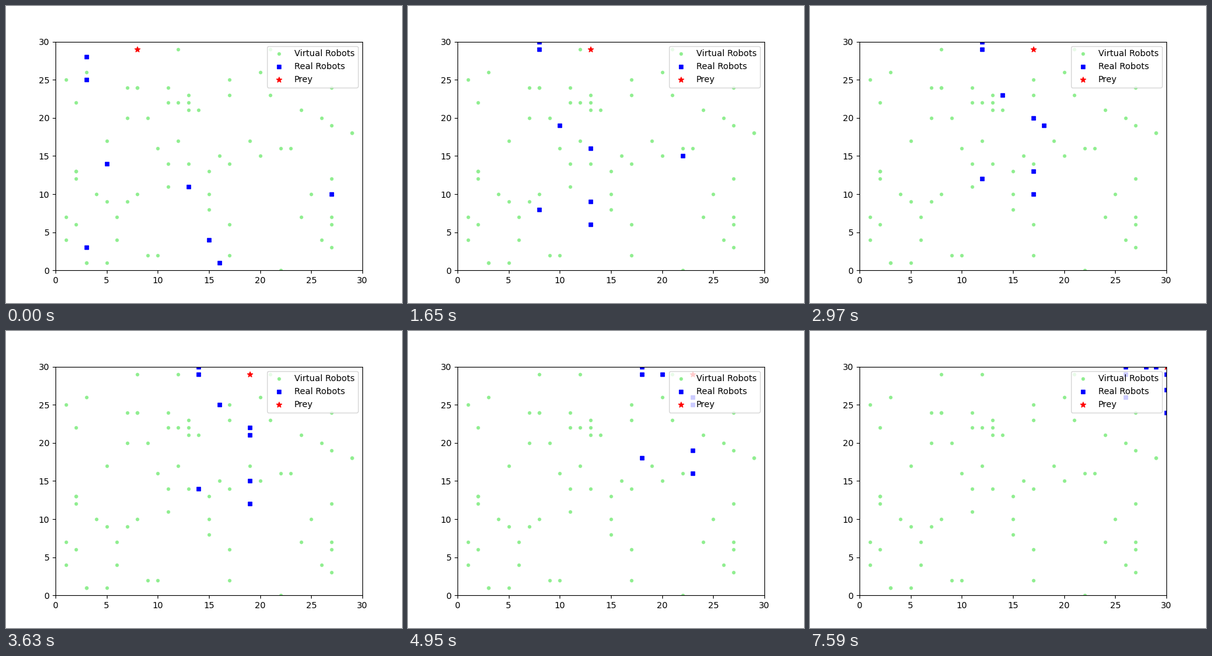
Animation of 640x480 px, one loop 9580 ms. Source, as a matplotlib script:

```python
import numpy as np
import matplotlib.pyplot as plt
from matplotlib.animation import FuncAnimation

SIZE = 30           # grid runs from 0 to SIZE on both axes
STEPS = 23
STEP_MS = 330
TICK_MS = 20
LOOP_MS = 9580

# Heights of the fixed virtual robots, grouped by column
VIRTUAL = {
    1: [4, 7, 25], 2: [6, 12, 13, 13, 22], 3: [1, 1, 26], 4: [10],
    5: [1, 9, 17], 6: [4, 7], 7: [9, 20, 24], 8: [10, 24, 24, 29],
    9: [2, 20], 10: [2, 16], 11: [11, 14, 22, 24], 12: [17, 22, 29],
    13: [14, 21, 22, 23], 14: [21], 15: [8, 10, 13], 16: [15],
    17: [2, 6, 14, 23, 25], 19: [17], 20: [15, 26], 21: [23, 29],
    22: [0, 16], 23: [16], 24: [7, 21], 25: [10], 26: [4, 20],
    27: [3, 6, 7, 12, 19, 24], 29: [18, 18],
}
# Robots move in this order, so earlier ones claim a cell first
ROBOTS = [(16, 1), (15, 4), (3, 3), (27, 10), (13, 11), (5, 14), (3, 25), (3, 28)]
PREY = (8, 29)


def flee(prey):
    """The prey runs right, then up once it meets the wall."""
    x, y = prey
    return (x + 1, y) if x < SIZE else (x, min(y + 1, SIZE))


def chase(pos, prey, taken):
    """Step towards the prey, sliding or sidestepping around taken cells."""
    x, y = pos
    dx, dy = np.sign(prey[0] - x), np.sign(prey[1] - y)
    for mx, my in [(dx, dy), (dx, 0), (0, dy), (dx, 1), (dx, -1)]:
        cell = (x + mx, y + my)
        if cell != pos and cell not in taken and max(cell) <= SIZE:
            return cell
    return pos


def simulate():
    prey, robots = PREY, list(ROBOTS)
    history = [(prey, list(robots))]
    for _ in range(STEPS):
        prey = flee(prey)
        for k, pos in enumerate(robots):
            others = robots[:k] + robots[k + 1:]
            robots[k] = chase(pos, prey, others + [prey])
        history.append((prey, list(robots)))
    return history


history = simulate()

fig, ax = plt.subplots(figsize=(6.4, 4.8), dpi=100)
ax.set_xlim(0, SIZE)
ax.set_ylim(0, SIZE)

dots = [(x, y) for x, ys in VIRTUAL.items() for y in ys]
ax.scatter(*zip(*dots), s=10, c="lightgreen", marker="o", label="Virtual Robots")
robot_marks = ax.scatter(*zip(*ROBOTS), s=20, c="blue", marker="s", label="Real Robots")
prey_mark = ax.scatter(*PREY, s=40, c="red", marker="*", label="Prey")
ax.legend(loc="upper right")


def update(i):
    # Half a tick is added so a step falls on the nearest tick
    step = min((i * TICK_MS + TICK_MS // 2) // STEP_MS, STEPS)
    prey, robots = history[step]
    robot_marks.set_offsets(robots)
    prey_mark.set_offsets([prey])
    return robot_marks, prey_mark


anim = FuncAnimation(fig, update, frames=LOOP_MS // TICK_MS, interval=TICK_MS,
                     repeat=True, repeat_delay=0)
plt.show()
```
